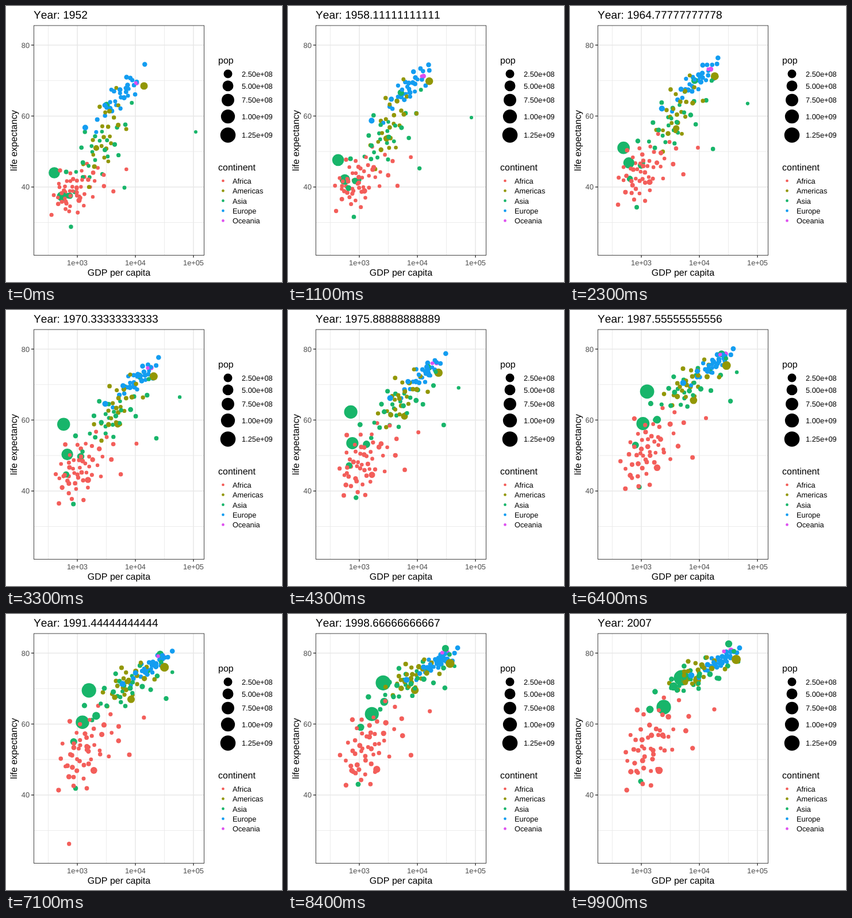
Animation, 480 px wide and 480 px high, one loop 10 s. Source, as an HTML page:

```html
<!DOCTYPE html>
<html lang="en">
<head>
<meta charset="utf-8">
<title>Life expectancy and GDP</title>
<style>
  html, body { margin: 0; width: 100%; height: 100%; overflow: hidden; background: #fff; }
  svg {
    display: block; width: 480px; height: 480px;
    font-family: "Liberation Sans", Arial, sans-serif;
    font-kerning: none; text-rendering: geometricPrecision;
  }
  .major { stroke: #e8e8e8; stroke-width: 1.55; }
  .minor { stroke: #e8e8e8; stroke-width: .8; }
  .tick { stroke: #333; stroke-width: 1.4; }
  .border { fill: none; stroke: #444; }
  .title { font-size: 19.2px; }
  .name { font-size: 16px; }
  .label { font-size: 12.8px; }
  .axis { font-size: 12.8px; fill: #4d4d4d; }
  .mid { text-anchor: middle; }
  .end { text-anchor: end; }
</style>
</head>
<body>
<svg viewBox="0 0 480 480">
  <clipPath id="panel"><rect x="48" y="34" width="297" height="400"/></clipPath>
  <g id="grid"></g>
  <g id="dots" clip-path="url(#panel)"></g>
  <rect class="border" x="48.5" y="34" width="296" height="399.5"/>
  <text id="year" class="title" x="48" y="22"></text>
  <text class="name mid" x="196.5" y="469">GDP per capita</text>
  <text class="name mid" transform="translate(19 234) rotate(-90)">life expectancy</text>
  <g id="legend">
    <text class="name" x="369" y="100">pop</text>
    <text class="name" x="369" y="286">continent</text>
  </g>
</svg>
<script>
const $ = id => document.getElementById(id);
const COLORS = {
  Africa: '#f35e5a', Americas: '#929705', Asia: '#18b56a', Europe: '#139df1', Oceania: '#de50ef'
};
const LAST = 99;   // steps in one loop, 100 ms each
const SPAN = 9;    // steps in five years

function add(parent, tag, attrs, text) {
  const el = document.createElementNS('http://www.w3.org/2000/svg', tag);
  for (const k in attrs) el.setAttribute(k, attrs[k]);
  if (text) el.textContent = text;
  parent.append(el);
  return el;
}

let seed = 1952;
function rand() {
  seed = (seed + 0x6D2B79F5) | 0;
  let t = Math.imul(seed ^ (seed >>> 15), 1 | seed);
  t = (t + Math.imul(t ^ (t >>> 7), 61 | t)) ^ t;
  return ((t ^ (t >>> 14)) >>> 0) / 4294967296;
}

const lerp = (a, b, f) => a + (b - a) * f;
const bell = u => .55 * Math.log(u / (1 - u));
const pointRadius = size => 1.067 * size + .75;
const popRadius = millions => pointRadius(2 + 10 * Math.sqrt(millions / 1319));

const dots = [];

// A smooth path through three points, evenly spaced in time.
// A crisis pushes the dot down and back within ten years.
function track(continent, [pop0, pop1], from, mid, to, crisis = { at: 0, depth: 0 }) {
  const through = (i, t) =>
    from[i] * 2 * (t - .5) * (t - 1) + mid[i] * 4 * t * (1 - t) + to[i] * 2 * t * (t - .5);
  dots.push({
    continent, pop0, pop1,
    place(step) {
      const t = step / LAST;
      const drop = crisis.depth * Math.max(0, 1 - Math.abs(step - crisis.at) / SPAN);
      return [through(0, t), through(1, t) + drop];
    }
  });
}

// Straight moves between random five-year offsets.
function wobble() {
  const knots = Array.from({ length: LAST / SPAN + 2 }, () => .36 * (rand() - .5));
  return step => {
    const i = Math.floor(step / SPAN);
    return lerp(knots[i], knots[i + 1], step / SPAN - i);
  };
}

// A drifting crowd; from and to hold x, spread in x, y, spread in y.
function cloud(continent, count, { from, to, rho, skew, pop, growth }) {
  for (let i = 0; i < count; i++) {
    const a = bell((i + .2 + .6 * rand()) / count);
    const b = bell(.03 + .94 * ((i * .618034 + .3) % 1));
    const wa = wobble(), wb = wobble();
    const pop0 = pop * Math.exp(1.8 * (rand() + rand() - 1));
    dots.push({
      continent, pop0, pop1: pop0 * growth, z: rand(),
      place(step) {
        const f = 1 - Math.pow(1 - step / LAST, 1.6);
        const [x, sx, y, sy] = from.map((v, k) => lerp(v, to[k], f));
        const p = a + skew * (a * a - 1) + wa(step);
        const q = b + wb(step);
        return [x + sx * p, y + sy * (rho * p + Math.sqrt(1 - rho * rho) * q)];
      }
    });
  }
}

// Large dots and outliers, from back to front; populations in millions.
track('Asia', [556, 1319], [84, 290], [116, 165], [194, 111], { at: 18, depth: 53 });
track('Asia', [372, 1110], [97, 331], [116, 220], [163, 162]);
track('Asia', [82, 224], [111, 330], [141, 220], [180, 126]);
track('Asia', [47, 150], [108, 330], [108, 260], [139, 166]);
track('Asia', [8, 32], [113, 384], [119, 320], [123, 291]);
track('Americas', [57, 190], [157, 247], [207, 176], [221, 115]);
track('Asia', [86, 127], [175, 172], [251, 92], [276, 52]);
track('Asia', [.2, 2.5], [330, 219], [294, 126], [293, 83]);
track('Africa', [33, 135], [127, 338], [148, 282], [155, 272]);
track('Africa', [2.5, 9], [93, 315], [104, 281], [118, 276], { at: 72, depth: 140 });
track('Asia', [4, 28], [206, 316], [275, 186], [259, 112]);
track('Americas', [158, 301], [240, 139], [265, 105], [289, 79]);
dots.forEach((d, i) => { d.z = i / dots.length; });

cloud('Africa', 50, {
  from: [123, 27, 319, 27], to: [145, 32, 223, 45],
  rho: -.45, skew: .17, pop: 3, growth: 3.8
});
cloud('Americas', 23, {
  from: [172, 19, 228, 48], to: [217, 24, 104, 18],
  rho: -.6, skew: .05, pop: 4, growth: 2.6
});
cloud('Asia', 25, {
  from: [160, 31, 252, 43], to: [213, 35, 113, 23],
  rho: -.65, skew: .05, pop: 5, growth: 3
});
cloud('Europe', 30, {
  from: [196, 25, 159, 30], to: [261, 21, 82, 14],
  rho: -.86, skew: -.12, pop: 11, growth: 1.35
});
cloud('Oceania', 2, {
  from: [226, 2, 134, 1], to: [272, 11, 64, 5],
  rho: -.9, skew: 0, pop: 4, growth: 2
});

// Grid and axes
const grid = $('grid');
const line = (cls, x1, y1, x2, y2) => add(grid, 'line', { class: cls, x1, y1, x2, y2 });
const gridX = i => 124 + 101 * i;
const gridY = i => 68 + 123.4 * i;
for (const [cls, shift] of [['minor', .5], ['major', 0]]) {
  for (let i = 0; i < 3; i++) {
    const x = gridX(i - shift), y = gridY(i + shift);
    line(cls, x, 34, x, 433);
    line(cls, 48, y, 345, y);
  }
}
for (let i = 0; i < 3; i++) {
  const x = gridX(i), y = gridY(i);
  line('tick', x, 433, x, 437.5);
  line('tick', 44, y, 48, y);
  add(grid, 'text', { class: 'axis mid', x, y: 451 }, `1e+0${i + 3}`);
  add(grid, 'text', { class: 'axis end', x: 41, y: y + 4.6 }, `${80 - 20 * i}`);
}

// Legends
const legend = $('legend');
for (let i = 0; i < 5; i++) {
  const millions = 250 * (i + 1);
  const y = 118 + 19 * i + 1.9 * i * i;
  const text = (millions * 1e6).toExponential(2).replace(/\+(\d)$/, '+0$1');
  add(legend, 'circle', { cx: 386, cy: y, r: popRadius(millions) });
  add(legend, 'text', { class: 'label', x: 410, y: y + 4.6 }, text);
}
Object.keys(COLORS).forEach((name, i) => {
  const y = 304 + 17.35 * i;
  add(legend, 'circle', { cx: 377.5, cy: y, r: pointRadius(1.5), fill: COLORS[name] });
  add(legend, 'text', { class: 'label', x: 394, y: y + 4.8 }, name);
});

dots.sort((a, b) => a.z - b.z);
for (const d of dots) d.el = add($('dots'), 'circle', { fill: COLORS[d.continent] });

function draw(step) {
  const year = 1952 + 55 * step / LAST;
  $('year').textContent = 'Year: ' + Number(year.toPrecision(15));
  for (const d of dots) {
    const [x, y] = d.place(step);
    d.el.setAttribute('cx', x.toFixed(2));
    d.el.setAttribute('cy', y.toFixed(2));
    d.el.setAttribute('r', popRadius(lerp(d.pop0, d.pop1, step / LAST)).toFixed(2));
  }
}

const start = performance.now();
let shown = -1;
function tick() {
  const step = Math.floor((performance.now() - start) % 10000 / 100);
  if (step !== shown) draw(shown = step);
  requestAnimationFrame(tick);
}
tick();
</script>
</body>
</html>
```
